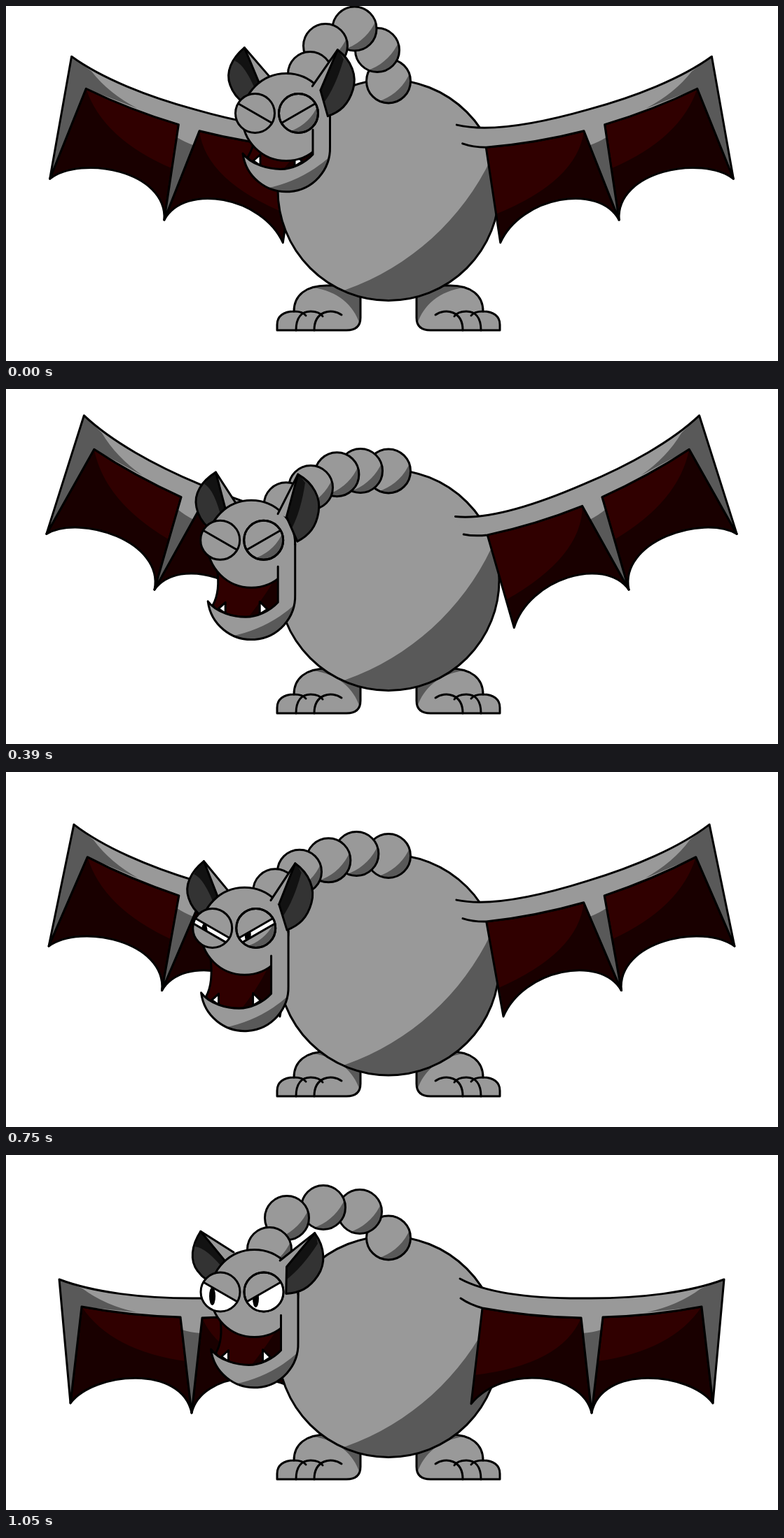
An HTML page with a canvas for the animation above (1.08 s loop, 1102x508 px).

```html
<!DOCTYPE html>
<html lang="en">
<head>
<meta charset="utf-8">
<title>Laughing gargoyle</title>
<style>
html, body { margin: 0; width: 100%; height: 100%; overflow: hidden; background: #fff; }
canvas { display: block; }
</style>
</head>
<body>
<canvas id="stage" width="1102" height="508"></canvas>
<script>
const ctx = document.getElementById('stage').getContext('2d');
const GREY = '#999', DARK = '#595959', RED = '#300000', DEEP = '#190000';
const rad = d => d * Math.PI / 180;

// Poses: head up, head down, resting stare.
// [bodyY, headX, headY, jaw, ear, wing, lid, eyeShift, four neck balls x, y]
const UP = [263.4, 400, 159, 42.5, 9, -15.2, -2, 0, 530, 63, 497.5, 32.5, 456, 57, 434, 97];
const DOWN = [276.7, 333.6, 242.7, 82.5, -1.5, -25.2, -2, 0, 498, 135, 464, 152, 428, 169, 388.5, 188];
const REST = [274.4, 354.5, 198, 70.5, 25.8, 0, 28, 1, 505, 81, 453, 75, 401, 90, 376, 135];
const mix = (a, b, u) => a.map((v, i) => v + (b[i] - v) * u);

function poseAt(t) {
  if (t >= 600) return mix(DOWN, REST, Math.min(1, (t - 600) / 450));
  return mix(UP, DOWN, 1 - Math.abs(1 - t % 240 / 120));
}

function fill(d, color) {
  ctx.fillStyle = color;
  ctx.fill(d instanceof Path2D ? d : new Path2D(d));
}

function line(d) {
  ctx.stroke(d instanceof Path2D ? d : new Path2D(d));
}

function shape(d, color) {
  fill(d, color);
  line(d);
}

function local(x, y, angle, draw) {
  ctx.save();
  ctx.translate(x, y);
  ctx.rotate(rad(angle));
  draw();
  ctx.restore();
}

function circle(x, y, r) {
  const p = new Path2D();
  p.arc(x, y, r, 0, 7);
  return p;
}

// Darkens the part of a shape that lies outside a circle of light.
function shade(path, x, y, r) {
  const p = new Path2D();
  p.rect(-500, -500, 2500, 2000);
  p.arc(x, y, r, 0, 7);
  ctx.save();
  ctx.clip(path);
  ctx.fillStyle = DARK;
  ctx.fill(p, 'evenodd');
  ctx.restore();
}

function ball(x, y, r) {
  const p = circle(x, y, r);
  fill(p, GREY);
  shade(p, x - r * 1.165, y - r * 1.278, r * 2.316);
  line(p);
}

function mirrored(axis, draw) {
  ctx.save();
  ctx.translate(2 * axis, 0);
  ctx.scale(-1, 1);
  draw();
  ctx.restore();
}

function foot() {
  const leg = 'M387 464 V456 C387 444 396 437 411 437 C411 414 428 400 458 400 L506 400 V446 Q506 464 486 464 Z';
  fill(leg, GREY);
  fill('M438 403 C474 408 496 428 505 455 L506 400 H458 Z', DARK);
  line(leg);
  line('M411 437 Q424 437 428 443 M414 464 C414 446 422 437 435 437 Q447 437 452 444 M440 464 C440 436 465 432 479 442');
}

function wing(bodyY, angle) {
  local(661, bodyY - 77.9, angle, () => {
    ctx.translate(-661, -196.5);
    const inner = 'M680 219 Q750 232 821 233 L836 369 C822 310 710 300 664 356 Z';
    const outer = 'M852 232 Q924 230 993 217 L1009 355 C975 310 850 300 836 369 Z';
    const arm = 'M648 177 C690 200 760 206 835 205 C905 205 975 197 1025 178 L1009 355 L993 217 Q924 230 852 232 L836 369 L821 233 Q750 232 680 219 Q662 214 649 205';
    fill(inner, RED);
    fill('M821 233 Q793 300 668 315 L664 356 C710 300 822 310 836 369 Z', DEEP);
    line(inner);
    fill(outer, RED);
    fill('M993 217 Q951 280 845 295 L836 369 C850 300 975 310 1009 355 Z', DEEP);
    line(outer);
    fill(arm, GREY);
    fill('M915 225 Q960 215 992 191 L1025 178 L1009 355 L993 217 Z', DARK);
    fill('M823 255 Q838 254 850 250 L836 369 Z', DARK);
    line(arm);
  });
}

function leftEar() {
  const inside = 'M-17.5 -66.5 C-38 -54 -50 -36 -46 -17 Q-43 0 -30 12 L-17 30 L-5 -15 Z';
  fill('M-17.5 -66.5 L9 -24 L14 -8 L-5 0 Z', GREY);
  fill(inside, '#333');
  fill('M-17.5 -66.5 Q-28 -60 -34 -50 Q-20 -42 -10 2 L-5 -15 Z', '#121212');
  line(inside);
  line('M-17.5 -66.5 L12 -19');
}

function rightEar() {
  const inside = 'M19.5 -52 C42 -40 53 -19 50 1 C47 23 37 35 20.5 44 L4.4 9 Z';
  fill('M19.5 -52 L-8 5 L5 10 Z', GREY);
  fill(inside, '#333');
  fill('M19.5 -52 Q26 -47 30 -40 Q25 0 12 26 L4.4 9 Z', '#121212');
  line(inside);
  line('M19.5 -52 L-8 5');
}

function eye(x, y, tilt, lid, shaded) {
  local(x, y, 0, () => {
    const rim = circle(0, 0, 28);
    if (shaded) ball(0, 0, 28);
    else fill(rim, GREY);
    ctx.save();
    ctx.clip(rim);
    ctx.rotate(rad(tilt));
    if (lid > 0) {
      ctx.save();
      const gap = new Path2D();
      gap.rect(-30, 0, 60, lid);
      ctx.clip(gap);
      fill(gap, '#fff');
      ctx.rotate(rad(-tilt));
      ctx.beginPath();
      ctx.ellipse(-11.5, shaded ? 9 : 6, 4.5, 13, 0, 0, 7);
      ctx.fillStyle = '#000';
      ctx.fill();
      ctx.restore();
    }
    line(`M-28 0 H28 M-28 ${lid} H28`);
    ctx.restore();
    line(rim);
  });
}

function head(jaw, ear, lid, shift) {
  const corner = 18 + (jaw - 42.5) * .475;
  const lip = `C-50 ${jaw + 26} -24 ${jaw + 32} -8 ${jaw + 32} S26 ${jaw + 24} 38 ${jaw + 11}`;
  const tip = `-62 ${jaw + 9.5}`;
  const cheek = `M62.5 0 V${jaw} A62.5 62.5 0 0 1 ${tip} ${lip} V${corner}`;

  local(-32, -36.5, -ear, leftEar);
  shape(`M-49 34 Q-44 ${jaw - 4} -55 ${jaw + 15} ${lip} V${corner} Z`, RED);
  fill(`M38 42 Q24 ${jaw - 4} -4 ${jaw + 32} L10 ${jaw + 29} L38 ${jaw + 11} Z`, DEEP);
  shape(`M-47 ${jaw + 20} L-37 ${jaw + 11} V${jaw + 27} Z`, '#fff');
  shape(`M12 ${jaw + 28} V${jaw + 10} L23 ${jaw + 21} Z`, '#fff');
  shape(circle(0, 0, 62.5), GREY);
  fill(cheek, GREY);
  shade(new Path2D(cheek), -65, jaw - 127, 190);
  line(cheek);
  eye(-44.5 - 4 * shift, -5.5 + 3.5 * shift, 30, lid, false);
  eye(17.5 - 4 * shift, -5.5 + 3.5 * shift, -30, lid, true);
  local(46, -48, ear, rightEar);
}

function draw(t) {
  const [bodyY, headX, headY, jaw, ear, flap, lid, shift, ...neck] = poseAt(t);
  ctx.clearRect(0, 0, 1102, 508);
  ctx.lineWidth = 3;
  ctx.lineCap = ctx.lineJoin = 'round';
  ctx.strokeStyle = '#000';
  foot();
  mirrored(546, foot);
  mirrored(550.5, () => wing(bodyY, flap));
  ball(546, bodyY, 158);
  ball(546, bodyY - 156, 31.5);
  for (let i = 0; i < neck.length; i += 2) ball(neck[i], neck[i + 1], 31.5);
  wing(bodyY, flap);
  local(headX, headY, 0, () => head(jaw, ear, Math.max(0, lid), shift));
}

function tick() {
  draw(Math.floor(performance.now() % 1080 / 30) * 30);
  requestAnimationFrame(tick);
}
tick();
</script>
</body>
</html>
```
